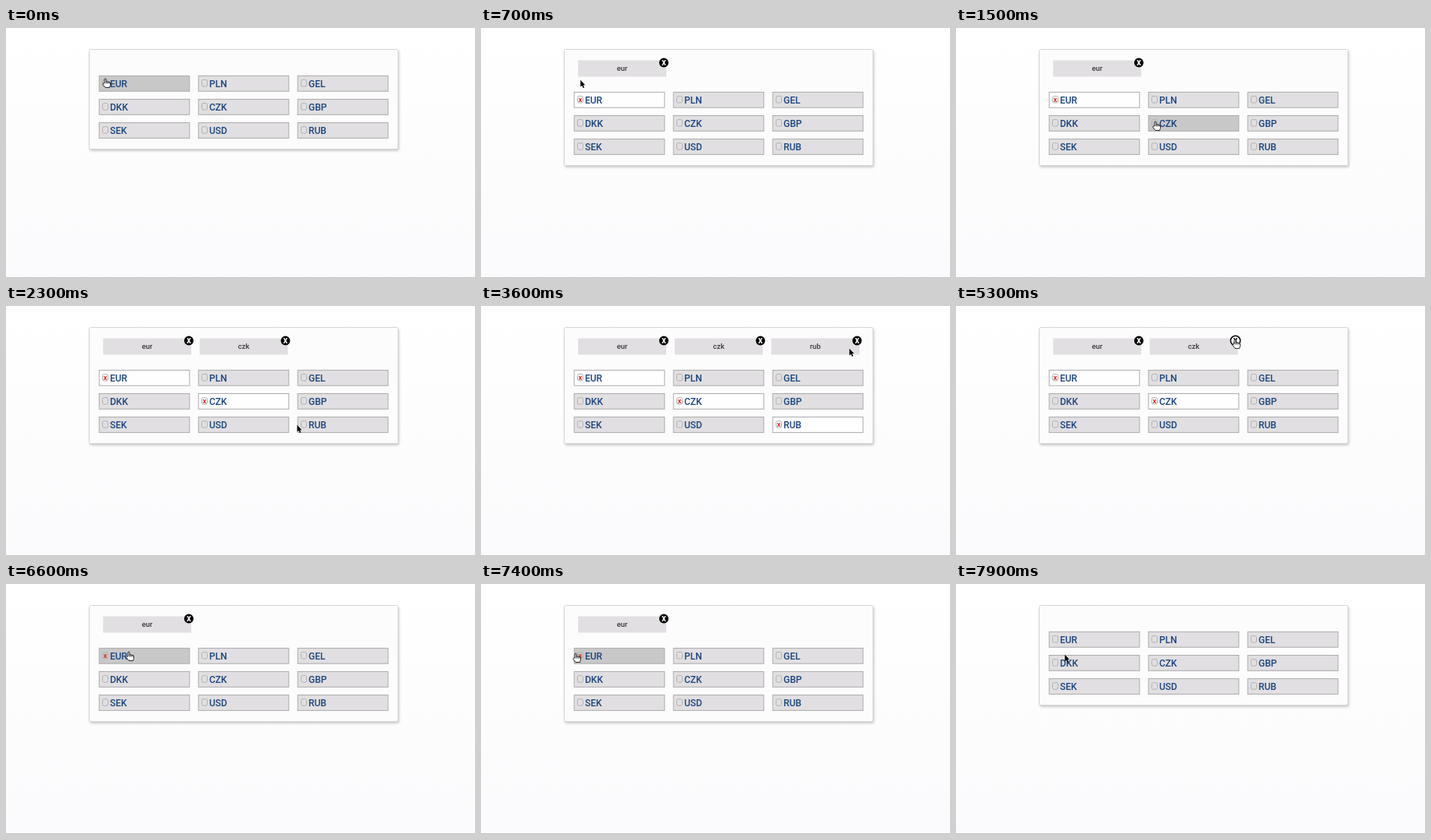
These frames come from a looping animation (600x321 px, 8 s). An HTML page:

```html
<!DOCTYPE html>
<html lang="en">
<head>
<meta charset="utf-8">
<title>Currency picker</title>
<style>
  html, body { margin: 0; width: 100%; height: 100%; overflow: hidden; background: #fcfbfc; }
  svg { display: block; width: 600px; height: 321px; font-family: Roboto, sans-serif; font-weight: 500; }
  .panel { fill: #fdfcfd; stroke: #d5d5d5; filter: drop-shadow(1.5px 2px 1.5px #0003); }
  .item { fill: #e1dfe1; stroke: #acabac; }
  .item.on { fill: #fefefe; }
  .item.hover { fill: #c9c8c9; }
  .label { font-size: 12.1px; fill: #1b4680; }
  .box { fill: none; stroke: #b2b1b2; }
  .mark { font-size: 9.5px; font-weight: 700; fill: #e0302c; text-anchor: middle; }
  .chip { fill: #e1dfe1; }
  .name { font-size: 9.5px; fill: #3a3a3e; text-anchor: middle; }
  .close { stroke: #000; stroke-width: 1.5; }
  .cross { font-size: 8.5px; font-weight: 900; text-anchor: middle; }
</style>
</head>
<body>
<svg id="stage" viewBox="0 0 600 321"></svg>
<script>
const LOOP = 8000, STEP = 100;
const stage = document.getElementById('stage');
const codes = ['EUR', 'PLN', 'GEL', 'DKK', 'CZK', 'GBP', 'SEK', 'USD', 'RUB'];

// Selected from / until, in ms
const picks = { EUR: [700, 7700], CZK: [1700, 5700], RUB: [2900, 4200] };

// Pointer moves; it rests in between
const home = { x: 127, y: 66 };
const moves = [
  { from: 700, to: 1500, x: 255, y: 121 },
  { from: 1700, to: 2500, x: 380, y: 154 },
  { from: 2900, to: 3900, x: 480, y: 44 },
  { from: 4600, to: 5300, x: 357, y: 44 },
  { from: 5700, to: 6600, x: 157, y: 88 },
  { from: 6600, to: 7400, x: 121, y: 90 },
  { from: 7700, to: 7900, x: 139, y: 90 }
];

const HAND = '<path d="M-1 5V0Q-1 -1 0 -1T1 0V3Q2 2.2 3 3.2Q4 2.6 5 3.6Q6.4 3.2 6.5 4.6V7.5' +
  'L5.5 10.5H0L-3 6.5Q-3.4 5 -2.2 5ZM1 3V5.5M3 3.4V5.5M5 3.8V5.5" fill="#fff" stroke="#111" stroke-width=".9"/>';
const ARROW = '<path d="M.3 .8V9.6L2.3 7.8 3.7 11 5.2 10.4 3.8 7.2H6.2Z"/>';

const backdrop = '<defs><linearGradient id="sky" x2="0" y2="1"><stop stop-color="#fff"/>' +
  '<stop offset="1" stop-color="#fbfafc"/></linearGradient></defs>' +
  '<rect width="600" height="321" fill="url(#sky)"/><path d="M0 320.5H600" stroke="#c4c3c4"/>';

const rect = (cls, x, y, w, h, r = 0) =>
  `<rect class="${cls}" x="${x}" y="${y}" width="${w}" height="${h}" rx="${r}"/>`;
const text = (cls, x, y, s, fill = '') =>
  `<text class="${cls}" x="${x}" y="${y}" fill="${fill}">${s}</text>`;

function pointer(t) {
  let { x, y } = home;
  for (const m of moves) {
    const p = Math.min(1, Math.max(0, (t - m.from) / (m.to - m.from)));
    const k = 1 - (1 - p) ** 2;
    x += (m.x - x) * k;
    y += (m.y - y) * k;
  }
  return [x, y];
}

function draw(t) {
  const [px, py] = pointer(t);
  const chosen = codes.filter(c => picks[c] && t >= picks[c][0] && t < picks[c][1]);
  const drop = chosen.length ? 21 : 0;
  let over = false;
  let out = backdrop + rect('panel', 106.5, 27.5, 395, 128 + drop, 2);

  chosen.forEach((code, i) => {
    const x = 124.2 + i * 123.6, cx = x + 109.7, cy = 44.5;
    const hover = Math.hypot(px - cx, py - cy) < 6.5;
    over ||= hover;
    out += rect('chip', x, 41.5, 112.8, 21) + text('name', x + 56.3, 55.3, code.toLowerCase()) +
      `<circle class="close" cx="${cx}" cy="${cy}" r="${hover ? 6.2 : 5.2}" fill="${hover ? '#fff' : '#000'}"/>` +
      text('cross', cx, cy + 3.1, 'X', hover ? '#000' : '#fff');
  });

  codes.forEach((code, i) => {
    const x = 119.2 + i % 3 * 127, y = 61.4 + Math.floor(i / 3) * 30.1 + drop;
    const w = 115.6, h = 19.8;
    const on = chosen.includes(code);
    const hover = px >= x && px <= x + w && py >= y && py <= y + h;
    over ||= hover;
    out += rect(`item${on ? ' on' : ''}${hover ? ' hover' : ''}`, x, y, w, h) +
      rect('box', x + 4.3, y + 5.1, 7, 8.5, 2) +
      (on ? text('mark', x + 7.8, y + 12.1, 'x') : '') +
      text('label', x + 13.7, y + 14.5, code);
  });

  stage.innerHTML = out + `<g transform="translate(${px} ${py})">${over ? HAND : ARROW}</g>`;
}

let start, last;
function tick(now) {
  start ??= now;
  const t = Math.floor((now - start) % LOOP / STEP) * STEP;
  if (t !== last) draw(last = t);
  requestAnimationFrame(tick);
}
draw(0);
requestAnimationFrame(tick);
</script>
</body>
</html>
```
